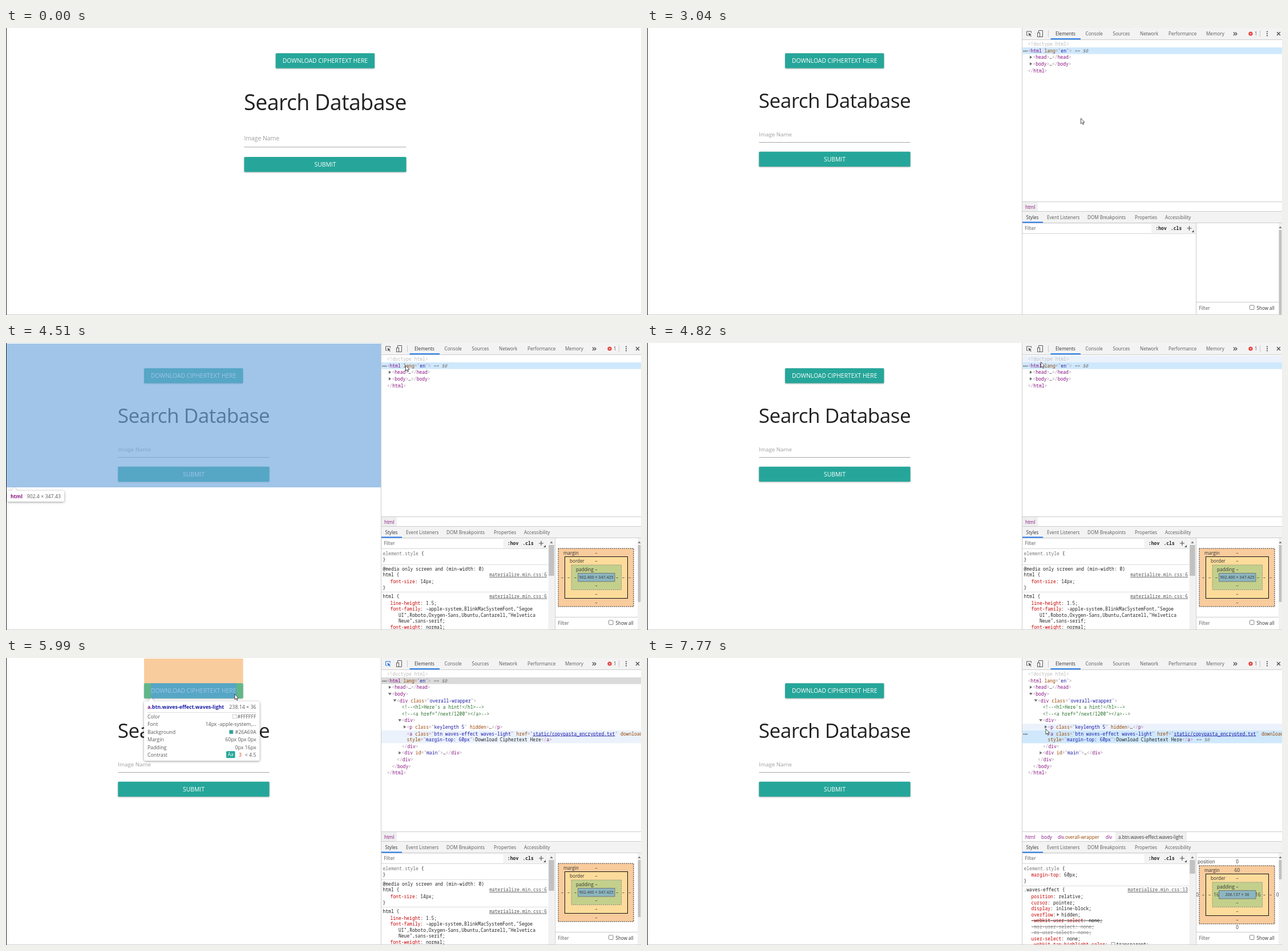
An HTML page that plays this animation: 1113x503 px, repeating every 8000 ms.

```html
<!DOCTYPE html>
<html lang="en">
<head>
<meta charset="utf-8">
<title>Search Database</title>
<style>
html, body { margin: 0; width: 100%; height: 100%; overflow: hidden; background: #fff; }
svg { display: block; width: 1113px; height: 503px; }
text { font: 8.15px "Open Sans", "Noto Sans", sans-serif; fill: #5a5a5a; white-space: pre; }
.mono { font: 8px "Noto Sans Mono", "DejaVu Sans Mono", monospace; fill: #222; }
.bold { font-weight: 700; }
.dark { fill: #333; }
.btn { font-size: 10.35px; fill: #fff; }
.tip text { font-size: 8.8px; }
.menu text { font-size: 8.6px; fill: #222; }
.tag { fill: #881280; }
.punc { fill: #a894a6; }
.attr { fill: #994500; }
.val { fill: #1a1aa6; }
.com { fill: #236e25; }
.dim { fill: #bdbdbd; }
.quiet { fill: #777; }
.ref { fill: #777; font-style: italic; }
.link { text-decoration: underline; }
.prop { fill: #c80000; }
.off { text-decoration: line-through; }
.off.old, .off.old .prop { fill: #888; }
.raised { filter: drop-shadow(0 1px 1px rgba(0,0,0,.3)); }
.float { filter: drop-shadow(0 1px 2px rgba(0,0,0,.4)); }
</style>
</head>
<body>
<svg id="stage" viewBox="0 0 1113 503"></svg>
<script>
const TEAL = '#26a69a', BLUE = '#1a73e8', BAR = '#f3f3f3', RULE = '#ccc', SELECTED = '#cfe8fc';
const ROW = 11.6, TREE_TOP = 22.4, LINK_TOP = 127, LINK_H = 22.4;

// Drawing helpers; text is placed by its vertical middle
const esc = s => s.replace(/&/g, '&amp;').replace(/</g, '&lt;');
const span = (s, cls) => `<tspan class="${cls}">${esc(s)}</tspan>`;
const raw = (x, y, inner, cls = '', anchor = 'start', more = '') =>
  `<text x="${x}" y="${y}" dy=".34em" class="${cls}" text-anchor="${anchor}" ${more}>${inner}</text>`;
const text = (x, y, s, ...rest) => raw(x, y, esc(s), ...rest);
const rect = (x, y, w, h, fill, more = '') =>
  `<rect x="${x}" y="${y}" width="${w}" height="${h}" fill="${fill}" ${more}/>`;
const path = (d, stroke, more = '') => `<path d="${d}" fill="none" stroke="${stroke}" ${more}/>`;
const poly = (points, fill, more = '') => `<polygon points="${points}" fill="${fill}" ${more}/>`;
const group = (id, inner, cls = '') => `<g id="${id}" class="${cls}">${inner}</g>`;
const hline = (x1, x2, y, color = RULE) => path(`M${x1} ${y}H${x2}`, color);
const vline = (x, y1, y2, color = RULE) => path(`M${x} ${y1}V${y2}`, color);

// Web page
function page(id, x, w, btnX, size, ys) {
  const [head, label, line, submit] = ys, mid = x + w / 2;
  const button = (bx, by, bw, s) =>
    rect(bx, by, bw, 26.2, TEAL, 'rx="1.5" class="raised"') + text(bx + bw / 2, by + 13.6, s, 'btn', 'middle');
  return group(id,
    button(btnX, 44.2, 173.4, 'DOWNLOAD CIPHERTEXT HERE') +
    text(mid, head, 'Search Database', '', 'middle',
      `style="font-size:${size}px;letter-spacing:-.014em;fill:#212121"`) +
    text(x, label, 'Image Name', '', 'start', `style="font-size:${size * .277}px;fill:#9e9e9e"`) +
    hline(x, x + w, line, '#a8a8a8') + button(x, submit, w, 'SUBMIT'));
}

// Context menu
function menu() {
  const groups = [
    [['Back', 'Alt+Left Arrow'], ['Forward', 'Alt+Right Arrow'], ['Reload', 'Ctrl+R']],
    [['Save as...', 'Ctrl+S'], ['Print...', 'Ctrl+P'], ['Cast...', '']],
    [['Translate to English', '']],
    [['View page source', 'Ctrl+U'], ['Inspect', 'Ctrl+Shift+I']]];
  let y = 143, out = rect(600.5, 139.5, 190, 212, '#fff', 'stroke="#bbb" class="float"') +
    rect(601, 333, 189, 18, '#e8e8e9', 'id="menuHover"');
  groups.forEach((items, i) => {
    if (i) { out += hline(601, 790, y + 7, '#e4e4e4'); y += 14; }
    for (const [name, key] of items) {
      out += text(617, y + 9, name) + text(781, y + 9, key, '', 'end');
      y += 18.5;
    }
  });
  return group('menu', out, 'menu');
}

// Element highlights and their tooltips
const TINT = 'rgba(111,168,220,.66)';
function tip(x, y, w, h, name, size, rows = []) {
  const dot = name.search(/\.|$/);
  let out = `<g class="float">${rect(x, y, w, h, '#fff', 'rx="2"')}${poly(`${x + 7},${y + .5} ${x + 12.5},${y - 6} ${x + 18},${y + .5}`, '#fff')}</g>` +
    raw(x + 6, y + 10.5, span(name.slice(0, dot), 'tag') + span(name.slice(dot), 'val'), 'bold') +
    text(x + w - 6, y + 10.5, size, '', 'end');
  if (rows.length) out += hline(x + 6, x + w - 6, y + 19.5, '#ddd');
  rows.forEach(([label, value, swatch], i) => {
    const ry = y + 26.7 + i * 13.5;
    out += text(x + 6, ry, label) + text(x + w - 6, ry, value, '', 'end');
    if (swatch) out += rect(x + w - 47 - (swatch === TEAL ? 6 : 0), ry - 3.3, 6.5, 6.5, swatch, 'stroke="#aaa" stroke-width=".6"');
  });
  return `<g class="tip">${out}</g>`;
}
const FONT_ROW = ['Font', '14px -apple-system,...'];
const linkName = 'a.btn.waves-effect.waves-light', linkSize = '238.14 × 36';
const overlays =
  group('htmlMark', rect(1, 1, 656.5, 252, TINT) + tip(2, 259, 100, 19, 'html', '902.4 × 347.43')) +
  group('wrapMark', rect(1, 1, 656.5, 252, TINT) +
    tip(228, 259, 203, 66, 'div.overall-wrapper', '902.4 × 347.43',
      [['Color', '#000000'], FONT_ROW, ['Margin', '0px']])) +
  group('linkMark', rect(242, 1, 173.6, 43.2, 'rgba(246,178,107,.66)') +
    rect(242, 44.2, 12, 26.3, 'rgba(147,196,125,.55)') + rect(403.6, 44.2, 12, 26.3, 'rgba(147,196,125,.55)') +
    rect(254, 44.2, 149.6, 26.3, TINT)) +
  group('linkTip', tip(242, 76, 202.5, 20, linkName, linkSize)) +
  group('linkInfo', tip(242, 76, 202.5, 104, linkName, linkSize, [
    ['Color', '#FFFFFF', '#fff'], FONT_ROW, ['Background', '#26A69A', TEAL],
    ['Margin', '60px 0px 0px'], ['Padding', '0px 16px'], ['Contrast', '< 4.5']]) +
    rect(386, 163.3, 15.5, 12, TEAL, 'rx="1.5"') +
    text(393.7, 169.6, 'Aa', '', 'middle', 'style="fill:#fff"') +
    text(408, 170.2, '3', '', 'start', 'style="fill:#d9441f;font-size:8.8px"'));

// Element tree
const TOKENS = /(<!.*)|(<\/?)(\w+)|([\w-]+)(=")([^"]*)(")|(>)|(== \$0)|( hidden| download)/g;
const code = (x, y, src) => raw(x, y, src.replace(TOKENS,
  (m, bang, lt, tag, attr, eq, val, quote, gt, ref) =>
    bang ? span(bang, bang[2] === '-' ? 'com' : 'dim') :
    lt ? span(lt, 'punc') + span(tag, 'tag') :
    attr ? span(attr, 'attr') + span(eq, 'punc') + span(val, attr === 'href' ? 'val link' : 'val') + span(quote, 'punc') :
    gt ? span(gt, 'punc') : ref ? span(ref, 'ref') : span(m, 'attr')), 'mono');
const fold = (x, y, open) => open
  ? poly(`${x - 6.5},${y - 2.3} ${x - .8},${y - 2.3} ${x - 3.6},${y + 2}`, '#6e6e6e')
  : poly(`${x - 5.5},${y - 3.2} ${x - 1.2},${y - .4} ${x - 5.5},${y + 2.4}`, '#6e6e6e');
// Each line: depth, source, fold mark (0 none, 1 closed, 2 open)
function lines(list, first) {
  let y = first;
  return list.map(([depth, src, mark]) => {
    const x = 667.7 + depth * 8.7;
    const out = code(x, y, src) + (mark ? fold(x, y, mark === 2) : '');
    y += src.startsWith('<a ') ? 10.6 : ROW;
    return out;
  }).join('');
}
const tree =
  rect(658, 34, 455, ROW, SELECTED, 'id="sel"') + rect(658, 0, 455, ROW, '#ebf2fc', 'id="hover"') +
  group('dots', [660.4, 663.2, 666].map(x => `<circle cx="${x}" cy="0" r="1" fill="#555"/>`).join('')) +
  lines([[0, '<!doctype html>'], [0, '<html lang="en">'], [1, '<head>…</head>', 1]], 28.4) +
  group('htmlRef', code(749, 40, '== $0')) +
  group('closed', lines([[1, '<body>…</body>', 1], [0, '</html>']], 63.2)) +
  group('open', lines([
    [1, '<body>', 2],
    [2, '<div class="overall-wrapper">', 2],
    [3, '<!--<h1>Here\'s a hint!</h1>-->'],
    [3, '<!--<a href="/next/1200"></a>-->'],
    [3, '<div>', 2],
    [4, '<p class="keylength 5" hidden>…</p>', 1],
    [4, '<a class="btn waves-effect waves-light" href="static/copypasta_encrypted.txt" download'],
    [4, 'style="margin-top: 60px">Download Ciphertext Here</a>'],
    [3, '</div>'],
    [3, '<div id="main">…</div>', 1],
    [2, '</div>'],
    [1, '</body>'],
    [0, '</html>']], 63.2)) +
  group('linkRef', code(962, 143.4, '== $0'));

// Tool bars
const tabs = (list, y) => list.map(([x, s], i) => text(x, y, s, i ? '' : 'dark')).join('');
const toolbar =
  rect(658, 0, 455, 20, BAR) + hline(658, 1113, 20.5) +
  group('pick', '<path d="M668 13H665.5V6H673.5V8.5" fill="none" stroke="currentColor"/>' +
    '<path d="M668.5 8.5L674 11.2L671.8 12L673.8 14.5L672.8 15.2L671 12.8L669.7 14.5Z" fill="currentColor"/>') +
  path('M686.5 8V4.5H693.5V15.5H689', '#5a5a5a') + rect(684.5, 8.5, 4, 7, BAR, 'stroke="#5a5a5a"') +
  vline(703.5, 4, 16) + vline(1074.5, 4, 16) +
  tabs([[716, 'Elements'], [768.5, 'Console'], [816.5, 'Sources'], [864, 'Network'], [914, 'Performance'], [980, 'Memory']], 10.5) +
  rect(707.5, 18.2, 52.5, 1.9, BLUE) +
  path('M1028 7.5L1030.6 10.2L1028 13M1031.3 7.5L1034 10.2L1031.3 13', '#444', 'stroke-width="1.2"') +
  '<circle cx="1058" cy="10" r="3.6" fill="#e53935"/>' + path('M1056.6 8.6L1059.4 11.4M1059.4 8.6L1056.6 11.4', '#fff', 'stroke-width=".8"') +
  text(1065, 10.5, '1') +
  [6.5, 10, 13.5].map(y => `<circle cx="1087" cy="${y}" r="1.1" fill="#444"/>`).join('') +
  path('M1104 7L1110 13M1110 7L1104 13', '#444', 'stroke-width="1.2"');

const crumbs = hline(658, 1113, 304.5) +
  group('crumb', rect(658, 305, 27, 16, '#efefef') + text(663, 314, 'html', 'tag')) +
  group('crumbPath', rect(821, 305, 125, 16, '#efefef') + text(663, 314, 'html', 'tag') + text(691, 314, 'body', 'tag') +
    raw(720, 314, span('div', 'tag') + span('.overall-wrapper', 'attr')) + text(804, 314, 'div', 'tag') +
    text(826, 314, linkName, 'dark'));

const paneTabs = rect(658, 321, 455, 20.5, BAR) + hline(658, 1113, 321.5) + hline(658, 1113, 341.5) +
  tabs([[664.5, 'Styles'], [701, 'Event Listeners'], [772, 'DOM Breakpoints'], [855, 'Properties'], [908, 'Accessibility']], 332) +
  rect(658, 339.6, 36, 1.9, BLUE);

const filterBar = right => rect(658, 342, right + 78 - 658, 18.5, BAR) + hline(658, right + 78, 360.5, '#ddd') +
  rect(659.5, 344, right - 659.5, 15, '#fff') + text(662.5, 351.7, 'Filter') +
  text(right + 7.5, 351.5, ':hov', 'mono bold') + text(right + 34, 351.5, '.cls', 'mono bold') +
  path(`M${right + 62.5} 351H${right + 70.5}M${right + 66.5} 347V355`, '#555', 'stroke-width="1.2"') +
  poly(`${right + 74.5},354 ${right + 74.5},358 ${right + 70.5},358`, '#555');
const scroller = (x, w, thumb) => rect(x, 342, w, 161, '#f1f1f1') +
  poly(`${x + w / 2 - 2.5},351 ${x + w / 2 + 2.5},351 ${x + w / 2},347.5`, '#777') +
  rect(x + .7, 354, w - 1.4, thumb, '#c1c1c1');

// Style rules
const rule = (y, s) => text(660.5, y, s, 'mono');
const prop = (y, s, cls = '') => {
  const cut = s.indexOf(':');
  return raw(673.5, y, span(s.slice(0, cut), 'prop') + esc(s.slice(cut)), 'mono ' + cls);
};
const source = (y, s) => text(948, y, s, 'mono link', 'end', 'style="fill:#555"');
const elementStyle = raw(660.5, 368.8, span('element.style', 'quiet') + ' {', 'mono');

// Box model
function boxModel(dy, top, side, size) {
  const g = '–', at = (x, y, s) => text(x, y + dy, s, 'dark', 'middle');
  const ring = (x, y, w, h, fill, stroke, dash) =>
    rect(x, y + dy, w, h, fill, `stroke="${stroke}" ${dash ? 'stroke-dasharray="2 1.5"' : ''}`);
  return ring(968, 360, 132, 102, '#f9cc9d', '#222', true) + ring(979.5, 374.5, 110, 73, '#fddc9b', '#111') +
    ring(991, 389, 87.5, 43.5, '#c3d08b', '#888', true) + ring(1002.5, 403.5, 64.5, 14.5, '#8cb6c0', '#777') +
    text(977, 368 + dy, 'margin', 'dark') + text(988, 382.5 + dy, 'border', 'dark') + text(999, 397 + dy, 'padding', 'dark') +
    at(1034.5, 368, top) + [382.5, 397, 425.5, 440, 455].map(y => at(1034.5, y, g)).join('') +
    [975, 986, 1082, 1093].map(x => at(x, 411, g)).join('') + at(998, 411, side) + at(1071, 411, side) +
    text(1034.5, 411 + dy, size, 'dark', 'middle', 'style="font-size:7.1px"');
}

const styles =
  group('stylesEmpty', filterBar(884) + scroller(1107, 6, 149)) +
  group('stylesHtml', filterBar(871.5) + elementStyle + rule(380, '}') + hline(658, 950, 388.5, '#ddd') +
    rule(396, '@media only screen and (min-width: 0)') + rule(406.5, 'html {') + source(406.5, 'materialize.min.css:6') +
    prop(418.5, 'font-size: 14px;') + rule(429, '}') + hline(658, 950, 436.5, '#ddd') +
    rule(444, 'html {') + source(444, 'materialize.min.css:6') +
    prop(456, 'line-height: 1.5;') + prop(466.7, 'font-family: -apple-system,BlinkMacSystemFont,"Segoe') +
    text(688, 477.2, 'UI",Roboto,Oxygen-Sans,Ubuntu,Cantarell,"Helvetica', 'mono') +
    text(688, 487.7, 'Neue",sans-serif;', 'mono') + prop(498, 'font-weight: normal;') +
    scroller(950.5, 11, 54) + scroller(1107, 6, 100) + boxModel(0, '–', '–', '902.400 × 347.425')) +
  group('stylesLink', filterBar(871.5) + elementStyle + prop(380, 'margin-top: 60px;') + rule(391, '}') +
    hline(658, 950, 399.5, '#ddd') + rule(406.5, '.waves-effect {') + source(406.5, 'materialize.min.css:13') +
    prop(418.5, 'position: relative;') + prop(429, 'cursor: pointer;') + prop(439.5, 'display: inline-block;') +
    prop(450, 'overflow:  hidden;') + poly('718.5,447 722.5,449.7 718.5,452.4', '#6e6e6e') +
    prop(460.5, '-webkit-user-select: none;', 'off') + prop(471, '-moz-user-select: none;', 'off old') +
    prop(481.5, '-ms-user-select: none;', 'off old') + prop(492, 'user-select: none;') +
    prop(502, '-webkit-tap-highlight-color:   transparent;') + rect(814, 498.5, 6, 6, '#fff', 'stroke="#999"') +
    scroller(950.5, 11, 24) + scroller(1107, 6, 34) + hline(966, 1106, 349.5, '#bbb') +
    boxModel(4, '60', '16', '206.137 × 36') + text(965, 357, 'position', 'dark') +
    [[1034.5, 357], [1034.5, 472.5], [964.5, 415], [1105, 415]].map(([x, y]) => text(x, y, '0', 'dark', 'middle')).join('')) +
  vline(962.5, 342, 503) + rect(963, 480, 144, 23, '#fff') + hline(963, 1107, 480.5) + text(967.5, 490.8, 'Filter') +
  rect(1056.5, 486, 7.5, 7.5, '#fff', 'stroke="#888" rx="1"') + text(1068.5, 490.8, 'Show all', 'dark');

document.getElementById('stage').innerHTML =
  rect(0, 0, 1113, 503, '#fff') +
  page('wide', 417.5, 284, 472.7, 37.5, [131.3, 193.3, 208.7, 226]) +
  page('narrow', 196.3, 265.3, 242, 35.1, [127.9, 186.5, 200.5, 216.8]) +
  menu() + group('marks', overlays) +
  group('tools', rect(657.5, 0, 456, 503, '#fff') + group('panels', tree + toolbar + crumbs + styles + paneTabs) + vline(657.5, 0, 503)) +
  hline(0, 1113, 502.5, '#d0d0d0') + vline(.5, 0, 503, '#222') +
  group('cursor', poly('.5,.3 .5,9.9 2.7,7.9 4.2,11.2 5.6,10.6 4.2,7.4 7,7.2', '#fff', 'stroke="#222" stroke-width=".8" stroke-linejoin="round"'));

// Motion: bursts of [start, end, steps] and pointer way points [time, x, y]
const LOOP = 8000;
const BURSTS = [[250, 940, 10], [1340, 1650, 5], [2880, 3670, 11], [3740, 4280, 8],
  [4510, 5200, 10], [5370, 6150, 11], [6760, 7530, 11], [7610, 7770, 3]];
const WAY = [[250, 948, 457], [480, 800, 400], [710, 620, 352], [787, 592, 350], [863, 600, 354],
  [1340, 600, 354], [1650, 648.3, 337.7], [2800, 648.3, 337.7], [3038, 760, 158], [3300, 757, 120], [3670, 727, 37],
  [3740, 727, 37], [3900, 712, 28], [4050, 690, 31], [4280, 700, 39], [4510, 700, 39], [4817, 690, 33],
  [5200, 666, 7], [5370, 666, 7], [5600, 600, 30], [5994, 400.5, 63], [6150, 362, 60],
  [6760, 362, 60], [7100, 560, 95], [7450, 705, 150], [7610, 702, 140], [7770, 698.5, 124]];

function snap(t) {
  const burst = BURSTS.filter(b => b[0] <= t).pop();
  if (!burst) return 0;
  const [start, end, n] = burst, step = (end - start) / (n - 1);
  return start + Math.min(Math.floor((t - start + 6) / step), n - 1) * step;
}
function pointer(t) {
  const i = WAY.findIndex(p => p[0] > t);
  if (i < 1) return (i ? WAY[WAY.length - 1] : WAY[0]).slice(1);
  const [t0, x0, y0] = WAY[i - 1], [t1, x1, y1] = WAY[i], k = (t - t0) / (t1 - t0);
  return [x0 + (x1 - x0) * k, y0 + (y1 - y0) * k];
}

const el = {};
document.querySelectorAll('[id]').forEach(e => el[e.id] = e);
const show = (id, on) => { el[id].style.display = on ? '' : 'none'; };
const set = (id, attrs) => { for (const k in attrs) el[id].setAttribute(k, attrs[k]); };

// Tree row under the pointer as [top, height]
function rowAt(x, y, open) {
  if (x < 658 || y < TREE_TOP || y > (open ? 207 : 80)) return null;
  if (open && y >= LINK_TOP) {
    if (y < LINK_TOP + LINK_H) return [LINK_TOP, LINK_H];
    const top = LINK_TOP + LINK_H;
    return [top + Math.floor((y - top) / ROW) * ROW, ROW];
  }
  return [TREE_TOP + Math.floor((y - TREE_TOP) / ROW) * ROW, ROW];
}

function draw(t) {
  const [x, y] = pointer(snap(t));
  const docked = t >= 2430, picking = t >= 5200 && t < 6520, chosen = t >= 6520, open = t >= 5520;
  const inPage = picking && x < 657;
  const onButton = inPage && x > 242 && x < 416 && y > 44 && y < 71;
  let row = docked && t >= 2880 ? rowAt(x, y, open) : null;
  const onHtml = row && !open && y >= 34 && y < 45.6;
  const onLink = row && chosen && row[0] === LINK_TOP;
  if (inPage && open) row = onButton ? [LINK_TOP, LINK_H] : [TREE_TOP + 4 * ROW, ROW];

  show('cursor', t >= 250);
  set('cursor', { transform: `translate(${x} ${y})` });
  show('wide', !docked);
  show('narrow', docked);
  show('tools', docked);
  show('panels', t >= 2490);
  show('menu', t >= 860 && t < 1880);
  el.menu.style.opacity = t < 1800 ? 1 : .4;
  show('menuHover', x > 604 && y < 351);

  show('htmlMark', onHtml && t > 3200);
  show('wrapMark', inPage && !onButton);
  show('linkMark', onButton || onLink);
  show('linkInfo', onButton);
  show('linkTip', onLink);

  show('closed', !open);
  show('open', open);
  show('htmlRef', !chosen);
  show('linkRef', chosen);
  set('sel', { y: chosen ? LINK_TOP : 34, height: chosen ? LINK_H : ROW, fill: picking ? '#dadada' : SELECTED });
  set('dots', { transform: `translate(0 ${chosen ? 133.5 : 40.5})` });
  show('hover', row && !onHtml && !onLink);
  if (row) set('hover', { y: row[0], height: row[1] });
  el.pick.style.color = picking ? BLUE : '#5a5a5a';

  show('crumb', t < 6610);
  show('crumbPath', t >= 6610);
  show('stylesEmpty', t < 3190);
  show('stylesHtml', t >= 3190 && t < 6830);
  show('stylesLink', t >= 6830);
}

const begin = performance.now();
function tick() {
  draw((performance.now() - begin) % LOOP);
  requestAnimationFrame(tick);
}
tick();
</script>
</body>
</html>
```
